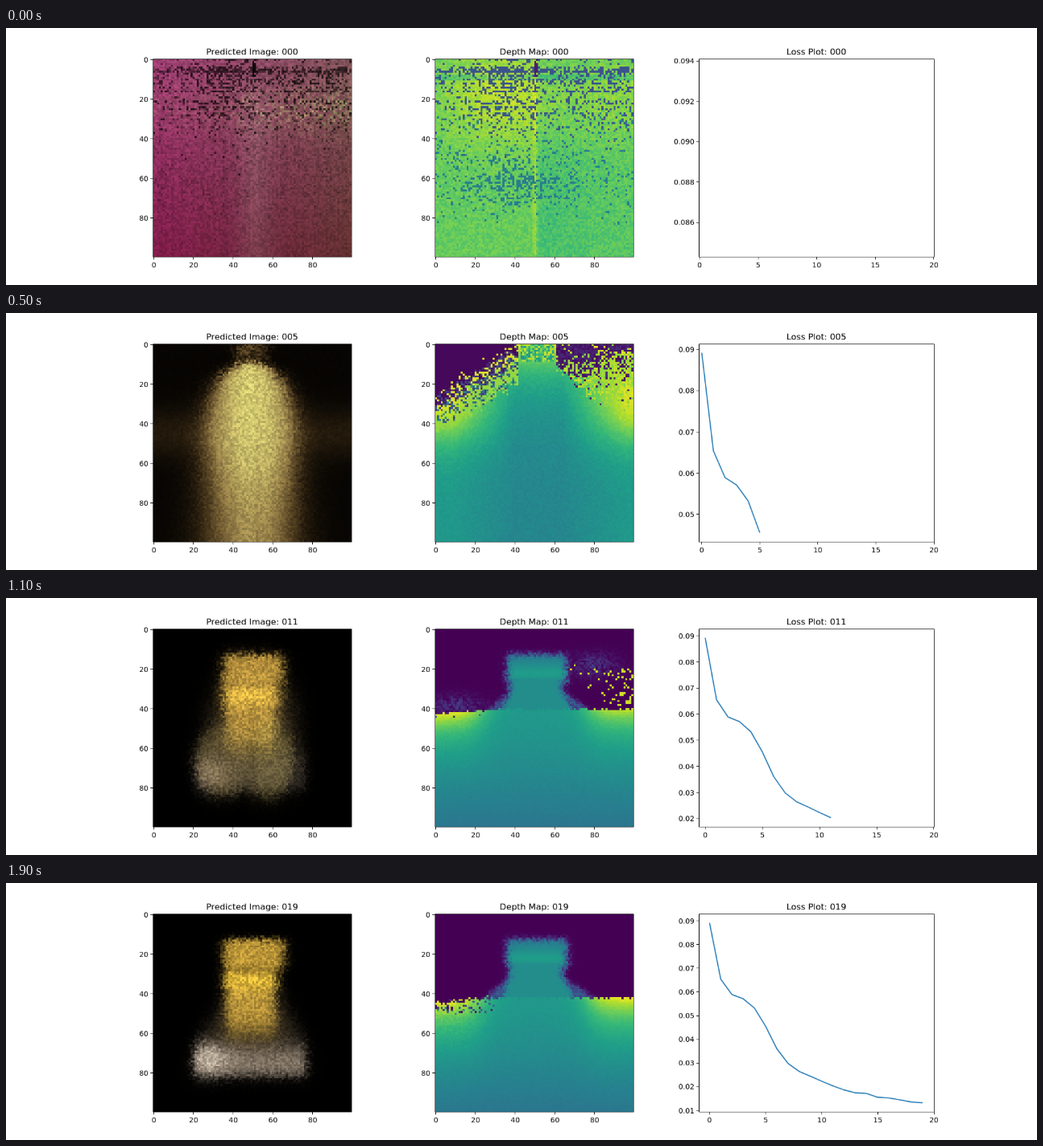
Write an HTML page with a canvas that moves like this. It is 1280x320 px and loops after 2000 ms.

```html
<!DOCTYPE html>
<html lang="en">
<head>
<meta charset="utf-8">
<title>Training progress</title>
<style>
html, body { margin: 0; width: 100%; height: 100%; overflow: hidden; background: #fff; }
canvas { display: block; }
</style>
</head>
<body>
<canvas id="stage" width="1280" height="320"></canvas>
<script>
const makeCanvas = (width, height) => Object.assign(document.createElement('canvas'), { width, height });
const stage = document.getElementById('stage').getContext('2d');
// The figure is drawn at 2000 x 500 and scaled down to the stage
const figure = makeCanvas(2000, 500), ctx = figure.getContext('2d');
const CELLS = 100, TOP = 60, SIDE = 385, BOTTOM = TOP + SIDE;
const LOSS = [.0892, .0654, .0589, .0571, .0532, .0455, .036, .0298, .0264, .0244,
  .0223, .0203, .0186, .0174, .0171, .0155, .0152, .0144, .0135, .0132];

// ---- maths helpers
const lerp = (a, b, w) => a + (b - a) * w;
const step = (edge, soft, x) => 1 / (1 + Math.exp((edge - x) / soft));
const fall = (edge, soft, x) => 1 - step(edge, soft, x);
const box = (x, lo, hi, soft) => step(lo, soft, x) * fall(hi, soft, x);
const bell = (x, c, w) => Math.exp(-(((x - c) / w) ** 2));
const clamp = x => Math.min(1, Math.max(0, x));
const mix = (a, b, w) => a.map((x, i) => lerp(x, b[i], w));

function hash(u, v, k) {
  let h = Math.imul(u + 1, 374761393) ^ Math.imul(v + 1, 668265263) ^ Math.imul(k + 1, 2246822519);
  h = Math.imul(h ^ h >>> 13, 1274126177);
  h = Math.imul(h ^ h >>> 16, 2654435761);
  return ((h ^ h >>> 15) >>> 0) / 2 ** 32;
}

const palette = list => list.split(' ').map(hex => [1, 3, 5].map(i => parseInt(hex.slice(i, i + 2), 16)));
const VIRIDIS = palette('#440154 #482878 #3e4989 #31688e #26828e #1f9e89 #35b779 #6ece58 #b5de2b #fde725');
const BROWN = palette('#060402 #32160a #70502a #a58a4e #c9b86c #e8e088');
const OLIVE = palette('#070502 #2c200f #5e4a27 #978048 #bbab60 #dcd576');

function ramp(stops, x) {
  const s = clamp(x) * (stops.length - 1), i = Math.min(stops.length - 2, Math.floor(s));
  return mix(stops[i], stops[i + 1], s - i);
}

// Each layer is [opacity, r, g, b], painted in order on black
const paint = (...layers) => layers.reduce((c, [a, ...col]) => mix(c, col, clamp(a)), [0, 0, 0]);
const shade = (c, f) => c.map(x => x * f);

const speck = (u, v) => hash(u, v, 901) <
  box(v, -9, 32, 4) * (.16 + .28 * bell(u, 35, 14) + .12 * step(60, 8, u)) * (.2 + 1.6 * hash(0, v, 77))
  + (v === 5 || v === 6 ? .3 : 0);
const slit = (u, v) => u >= 50 && u <= 51 && v < 9 && hash(u, v, 904) < .75;

// ---- predicted image stages: (column, row, random) -> rgb
function photoNoise(u, v, r) {
  const x = u / CELLS, y = v / CELLS, mid = bell(u, 51, 9) * step(20, 8, v);
  const beige = bell(v, 25, 11) * (.3 + .7 * step(45, 8, u)) * r(3) ** 2;
  const c = [
    158 - 32 * x - 32 * y + 12 * mid + 36 * beige,
    62 + 20 * x - 36 * y + 22 * mid + 80 * beige,
    114 - 26 * x - 42 * y + 16 * mid + 22 * beige
  ];
  const dark = slit(u, v) ? .12 : speck(u, v) ? .2 + .4 * r(1) : r(2) < .15 * box(v, 30, 75, 5) ? .8 : 1;
  return shade(c, dark * (.82 + .3 * r(0) + .08 * hash(u, 0, 79)));
}

function photoGlow(u, v, r) {
  let b = .12 + .3 * bell(v, 42, 38) - .0012 * u + .5 * bell(u, 48, 16);
  b *= 1 - .38 * fall(9, 1, v);
  b -= .12 * bell(u, 51, 1.2) + (v === 5 ? .08 : 0);
  return shade(ramp(BROWN, .2 + .76 * b), .86 + .28 * r(0));
}

function photoDome(u, v, r) {
  const ju = u + (r(1) - .5) * 4, jv = v + (r(2) - .5) * 3;
  const w = 22 * (1 - Math.exp(-Math.max(0, jv - 7) / 9)) + .05 * v;
  let b = step(8.5, .8, jv) * box(ju, 48.5 - w, 48.5 + w, 2 + .035 * v);
  b *= (.4 + .56 * bell(u, 50, 22)) * (1 - .32 * step(70, 10, v));
  b += .15 * bell(v, 45, 12) * (1 - b) + .3 * box(ju, 41, 57, 1.2) * fall(9, 1, v) * (.4 + r(3));
  b -= .08 * bell(u, 52, 1.2) * b;
  return shade(ramp(OLIVE, b), .84 + .3 * r(0));
}

function photoLobes(u, v, r) {
  u += (r(1) - .5) * 3.5;
  v += (r(2) - .5) * 3.5;
  const lobe = (cx, cy, rx, ry) => step(0, .1, 1 - Math.hypot((u - cx) / rx, (v - cy) / ry));
  return shade(paint(
    [box(u, 30, 72, 2.5) * box(v, 27, 78, 4) * .9, 40, 31, 15],
    [box(u, 35, 64, 1.5) * box(v, 12, 62, 1.5), 174, 136, 68],
    [lobe(35, 66, 14, 18) * .95, 168, 145, 82],
    [lobe(58, 65, 12, 20) * .95, 184, 164, 88],
    [box(u, 34, 65, 1.5) * bell(v, 32, 8), 238, 190, 88],
    [bell(u, 49.5, 2) * box(v, 42, 88, 2) * .5, 85, 65, 36]
  ), .78 + .38 * r(0));
}

const photoTower = q => (u, v, r) => {
  u += (r(1) - .5) * 3;
  v += (r(2) - .5) * 3;
  const flare = (v - 40) * .5, grey = mix([66, 58, 50], [138, 124, 108], q);
  return shade(paint(
    [box(u, lerp(26, 36 - flare, q), lerp(73, 64 + flare * .8, q), 2.2) * box(v, 37, 72, 4), 46, 38, 25],
    [box(u, 21, 76.5, 1) * step(lerp(62, 67, q), 2.8, v) * fall(81, 1.3, v), ...grey],
    [bell(u, 28, 9) * bell(v, 73, 7) * box(u, 20, 45, 1), ...mix([132, 116, 102], [202, 187, 168], q)],
    [box(u, 36.5, 61, 1.2) * box(v, 25, 59, 3.2) * .95, 200, 160, 62],
    [box(u, 36, 61.5, 1.2) * bell(v, 33, 5.5) * .9, 238, 196, 60],
    [box(u, 35.5, 65.5, 1.2) * box(v, 12.5, 26.5, .7), 195, 156, 58],
    [box(u, 35, 66, 1) * bell(v, 28, 1.2) * .4, 120, 92, 34]
  ), .78 + .38 * r(0));
};

// ---- depth map stages: (column, row, random) -> 0..1
function depthNoise(u, v, r) {
  if (slit(u, v)) return .08;
  if (speck(u, v)) return .26;
  const patch = .3 * bell(u, 42, 24) * box(v, 50, 73, 1) + .08 * box(v, 26, 78, 3);
  if (hash(u, v, 902) < patch * (.4 + 1.2 * hash(0, v, 78))) return .42;
  return .76 + bell(v, 18, 24) * (.14 * bell(u, 32, 28) + .09 * step(60, 8, u))
    - .05 * step(51, .5, u) * (1 - .5 * step(75, 5, u)) + .08 * bell(u, 50, 1.2)
    - (v > 7 && v < 11 ? .08 : 0) + (r(0) - .5) * .1;
}

function depthGlow(u, v, r) {
  const y = v / CELLS, left = fall(50, 1, u);
  if (hash(u, v, 903) < bell(u, 40, 13) * (v === 5 ? .6 : v < 28 ? .06 : 0)) return .1;
  return .62 - .28 * y - .06 * (1 - left) - .04 * step(80, 8, u) * y
    + .08 * left * bell(v, 25, 12) - .1 * box(v, 8.5, 13.5, .5)
    + (v === 6 ? .06 + .13 * left : v === 5 ? -.15 : 0)
    - .04 * bell(u, 53, 1.5) + (r(0) - .5) * (.2 * (1 - y) + .04);
}

function depthDome(u, v, r) {
  if (Math.abs(u - 51) < 9 && v < 9) return .5 + .45 * r(1);
  const side = clamp((Math.abs(u - 52) - 12) / 32);
  const d = .46 + .3 * Math.exp(-(v - 8) / 16) + side * (.33 * bell(v, 30, 21) + .07) + (r(0) - .5) * .04;
  if (u < 42) {
    const gap = 8 + (42 - u) * .6 + (r(1) - .5) * 8 - v;
    if (gap > 0) return gap < 9 && r(2) < .3 ? .95 : .02 + (gap < 6 ? .25 * r(3) : 0);
    return gap > -9 && r(2) < .3 ? .15 + .35 * r(3) : gap > -10 ? Math.max(d, .84) : d;
  }
  if (u > 60 && v < 8 + (u - 60) * .9 + r(0) * 5) {
    if (r(1) < fall(13, 4, v) * (.97 - .4 * step(80, 3, u) * step(3, 1, v))) return .02 + .1 * r(2);
    if (r(3) < .8 * fall(25, 4, v)) return .93 - .12 * r(2);
  }
  return d;
}

// A body standing on a lit ground plane
const landscape = ([horizon, tilt, decay, right, haze, specks, rough]) => (u, v, r) => {
  const h = horizon + tilt * Math.max(0, 1 - u / 32) + (r(1) - .5) * (u < 30 ? 1 + rough : 1);
  if (v >= h) {
    if (u < 30 && v < h + 6 && r(2) < rough * .12) return r(3) * .5;
    const glow = step(27, 4, Math.abs(u - 50)) * (u < 50 ? .45 : right);
    return .53 - .14 * (Math.max(0, v - 40) / 60) ** 1.5
      + glow * Math.exp(-(v - h) / decay) + (r(0) - .5) * .02;
  }
  const dots = .5 * step(87, 2, u) * box(v, 20, 38, .5) + (v === 21 || v === 22 ? .3 : .03 * step(19, 1, v));
  if (u > 66 && r(2) < specks * dots) return .93;
  const ju = u + (r(1) - .5) * 2.5, jv = v + (r(3) - .5) * 2;
  const part = (lo, hi, top, widen) => {
    const grow = Math.max(0, v - 31) * widen;
    return box(ju, lo - grow, hi + grow * 1.3, .8) * step(top, .7, jv);
  };
  const head = part(36, 66, 12.5, 0) * fall(27, .6, jv) * (.45 + .1 * bell(v, 22, 4));
  const mist = haze * r(0) * (bell(u, 80, 11) * bell(v, 18, 6) + bell(u, 10, 13) * bell(v, 38, 5));
  return Math.max(head, part(37, 64, 22, .45) * .49, part(37, 64, 26, 1.1) * (.16 + .16 * r(0)), mist);
};

// Last entry: depth function, or landscape settings
const STAGES = [
  [0, photoNoise, depthNoise],
  [3, photoGlow, depthGlow],
  [5, photoDome, depthDome],
  [9, photoLobes, [38.5, 2, 13, .28, .26, 1, 0]],
  [13, photoTower(0), [41, 2.5, 9, .46, .18, 0, .3]],
  [15, photoTower(.4), [41.5, 4.5, 11, .46, 0, 0, 1.5]],
  [19, photoTower(1), [41.7, 3, 13, .46, 0, 0, 2.5]]
];

const crossfade = (a, b, w) => (u, v, r) => w ? mix(a(u, v, r), b(u, v, r), w) : a(u, v, r);

function depthBetween(a, b, w) {
  if (Array.isArray(a)) return landscape(mix(a, b, w));
  const f = Array.isArray(b) ? landscape(b) : b;
  return (u, v, r) => w ? lerp(a(u, v, r), f(u, v, r), w) : a(u, v, r);
}

// ---- drawing
const grid = makeCanvas(CELLS, CELLS);
const gridCtx = grid.getContext('2d'), pixels = gridCtx.createImageData(CELLS, CELLS);

function heatmap(left, n, colorAt) {
  for (let v = 0, i = 0; v < CELLS; v++)
    for (let u = 0; u < CELLS; u++, i += 4)
      pixels.data.set([...colorAt(u, v, k => hash(u, v, k + 50 * n)), 255], i);
  gridCtx.putImageData(pixels, 0, 0);
  ctx.imageSmoothingEnabled = false;
  ctx.drawImage(grid, left, TOP, SIDE, SIDE);
}

const snap = x => Math.floor(x) + .5;

function label(text, x, y, align, size = 13.89) {
  ctx.font = `${size}px "DejaVu Sans", sans-serif`;
  ctx.textAlign = align;
  ctx.fillText(text, x, Math.round(y));
}

function line(points, color, width) {
  ctx.beginPath();
  points.forEach(([x, y]) => ctx.lineTo(x, y));
  ctx.strokeStyle = color;
  ctx.lineWidth = width;
  ctx.stroke();
}

function axes(title, left, width, xTicks, yTicks) {
  ctx.strokeStyle = ctx.fillStyle = '#000';
  ctx.lineWidth = 1;
  ctx.strokeRect(snap(left), snap(TOP), Math.round(width), SIDE);
  label(title, left + width / 2, 52, 'center', 16.67);
  for (const [text, x] of xTicks) {
    line([[snap(x), BOTTOM], [snap(x), BOTTOM + 5.4]], '#000', 1);
    label(text, x, 466, 'center');
  }
  for (const [text, y] of yTicks) {
    line([[left - 4.9, snap(y)], [left, snap(y)]], '#000', 1);
    label(text, left - 8.8, y + 5.3, 'right');
  }
}

function imageAxes(title, left) {
  const ticks = start => [0, 20, 40, 60, 80].map(k => [k, start + (k + .5) * SIDE / CELLS]);
  axes(title, left, SIDE, ticks(left), ticks(TOP));
}

function lossPlot(title, n) {
  const left = 1344.1, width = 455.9;
  const seen = LOSS.slice(0, n + 1);
  let hi = seen[0], lo = seen[n];
  if (!n) { hi *= 1.05; lo *= .95; }
  const pad = (hi - lo) * .05, xMin = -.05 * (n || 1.1);
  hi += pad;
  lo -= pad;
  const px = x => left + width * (x - xMin) / (20 - xMin);
  const py = y => BOTTOM - SIDE * (y - lo) / (hi - lo);
  const gap = [.002, .005, .01].find(s => s * 9 >= hi - lo);
  const yTicks = [];
  for (let k = Math.ceil(lo / gap); k * gap <= hi; k++)
    yTicks.push([(k * gap).toFixed(gap < .01 ? 3 : 2), py(k * gap)]);
  ctx.lineJoin = 'round';
  if (n) line(seen.map((y, x) => [px(x), py(y)]), '#1f77b4', 2.08);
  axes(title, left, width, [0, 5, 10, 15, 20].map(x => [x, px(x)]), yTicks);
}

function draw(n) {
  ctx.fillStyle = '#fff';
  ctx.fillRect(0, 0, 2000, 500);
  const i = STAGES.findLastIndex(s => s[0] <= n);
  const [start, photoA, depthA] = STAGES[i];
  const [end, photoB, depthB] = STAGES[i + 1] || STAGES[i];
  const w = n > start ? ((n - start) / (end - start)) ** .7 : 0;
  const depth = depthBetween(depthA, depthB, w);
  const count = String(n).padStart(3, '0');

  heatmap(285, n, crossfade(photoA, photoB, w));
  imageAxes(`Predicted Image: ${count}`, 285);
  heatmap(832, n, (u, v, r) => ramp(VIRIDIS, depth(u, v, r)));
  imageAxes(`Depth Map: ${count}`, 832);
  lossPlot(`Loss Plot: ${count}`, n);

  stage.imageSmoothingQuality = 'high';
  stage.drawImage(figure, 0, 0, 1280, 320);
}

let shown = -1;
function tick() {
  const n = Math.floor(performance.now() / 100) % 20;
  if (n !== shown) draw(shown = n);
  requestAnimationFrame(tick);
}
tick();
</script>
</body>
</html>
```
